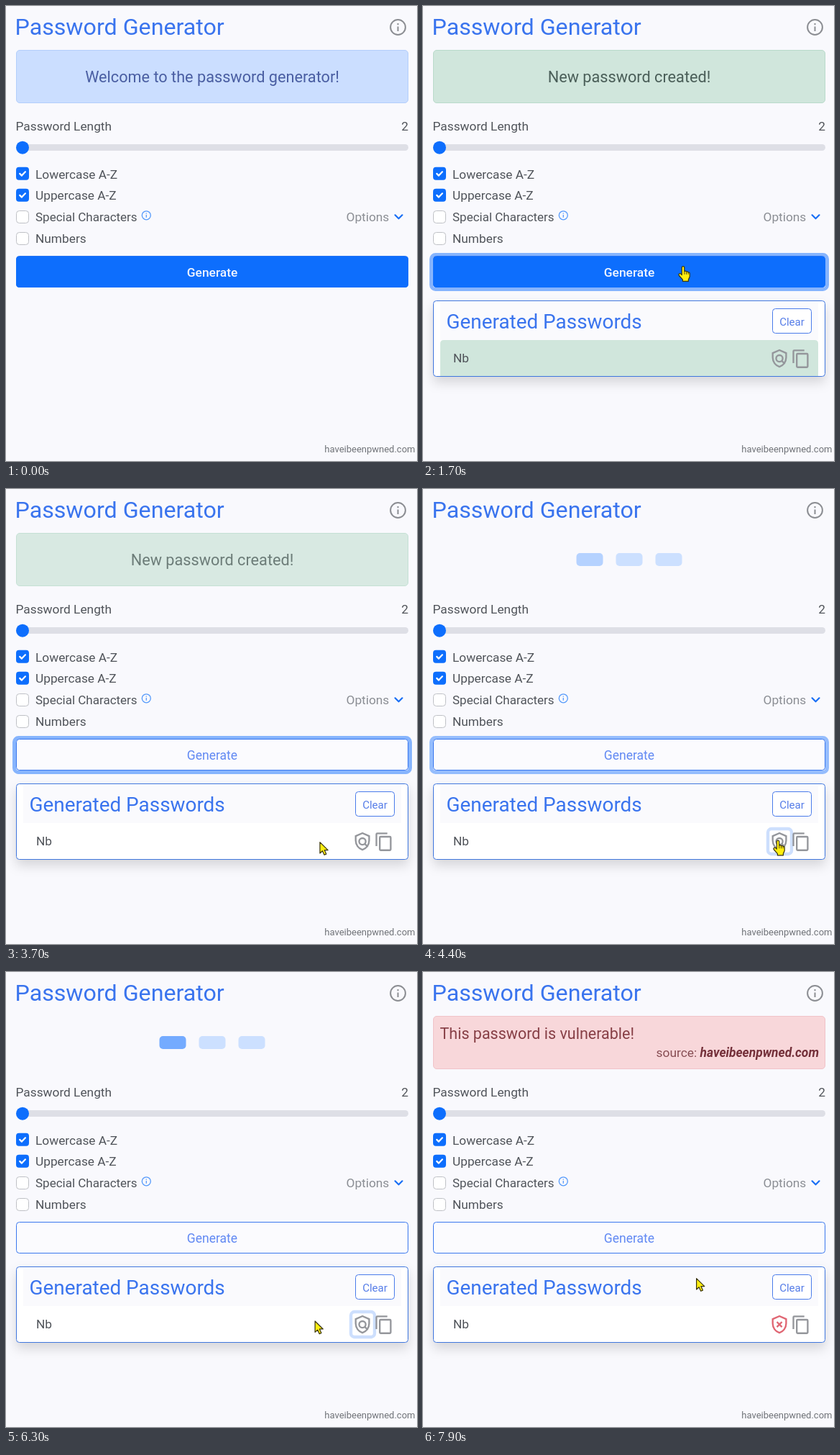
Write an HTML page that moves like this. It is 572 px wide and 632 px high and loops after 8 s.

```html
<!DOCTYPE html>
<html lang="en">
<head>
<meta charset="utf-8">
<title>Password Generator</title>
<style>
  html, body { margin: 0; width: 100%; height: 100%; overflow: hidden; background: #f9f9fd; }
  svg { display: block; width: 572px; height: 632px; }
  text { font-family: Roboto, "Open Sans", sans-serif; font-size: 17.3px; fill: #50545a; }
  .mid { text-anchor: middle; }
  .end { text-anchor: end; }
  .msg { font-size: 21.7px; }
  .head { fill: #3a74ee; }
  .line { fill: none; stroke-linecap: round; stroke-linejoin: round; }
  .icon { fill: none; stroke: #94969b; stroke-width: 2; }
  #panel { filter: drop-shadow(0 8px 8px rgba(0, 0, 0, .14)); }
</style>
</head>
<body>
<svg viewBox="0 0 572 632">
  <defs>
    <path id="shield" d="M12 2.1 4 5.65V11c0 5 3.4 9.6 8 10.9 4.6-1.3 8-5.9 8-10.9V5.65z"/>
    <g id="ticked">
      <rect width="18" height="18" rx="4" fill="#0d6efd"/>
      <path class="line" d="M5.200 9.200l2.700 2.700 5-5.300" stroke="#fff" stroke-width="2.2"/>
    </g>
    <rect id="empty" x=".5" y=".5" width="17" height="17" rx="4" fill="#fff" stroke="#bfc1c6"/>
  </defs>
  <rect width="572" height="632" fill="#f9f9fd"/>

  <text class="head" x="12.5" y="39.5" style="font-size:32.2px">Password Generator</text>
  <g fill="none" stroke="#8b8d92" stroke-width="2">
    <circle cx="545.5" cy="29.5" r="10.4"/>
    <path d="M545.5 28.5v6.5M545.5 24v2.3"/>
  </g>

  <g id="welcome">
    <rect x="14.5" y="61.5" width="545" height="73" rx="4.5" fill="#cbdeff" stroke="#b3cefb"/>
    <text class="mid msg" x="287" y="106" style="fill:#4a5ea2">Welcome to the password generator!</text>
  </g>
  <g id="created">
    <rect x="14.5" y="61.5" width="545" height="73" rx="4.5" fill="#d0e6dc" stroke="#b9dacb"/>
    <text class="mid msg" x="287" y="106" style="fill:#4a5e58">New password created!</text>
  </g>
  <g id="danger">
    <rect x="14.5" y="61.5" width="545" height="73" rx="4.5" fill="#f8d7da" stroke="#f1c3c8"/>
    <text class="msg" x="23.5" y="93" style="fill:#873f46;font-size:21.5px">This password is vulnerable!</text>
    <text class="end" x="551" y="118" style="fill:#874d53;font-size:17.4px">source: <tspan font-weight="700" font-style="italic" fill="#74303a">haveibeenpwned.com</tspan></text>
  </g>
  <g id="loader">
    <rect x="213.5" y="89" width="37" height="18" rx="5"/>
    <rect x="268.5" y="89" width="37" height="18" rx="5"/>
    <rect x="323.5" y="89" width="37" height="18" rx="5"/>
  </g>

  <text x="13.5" y="173">Password Length</text>
  <text class="end" x="560" y="173">2</text>
  <rect x="14" y="192" width="546" height="9" rx="4.5" fill="#dedfe6"/>
  <circle cx="23" cy="196.7" r="9" fill="#0d6efd"/>

  <use href="#ticked" x="14" y="223.7"/>
  <use href="#ticked" x="14" y="253.7"/>
  <use href="#empty" x="14" y="284"/>
  <use href="#empty" x="14" y="314"/>
  <text x="41" y="239.5">Lowercase A-Z</text>
  <text x="41" y="269">Uppercase A-Z</text>
  <text x="41" y="299" style="font-size:17px">Special Characters</text>
  <text x="41" y="328.5">Numbers</text>
  <g fill="none" stroke="#559afb" stroke-width="1.3">
    <circle cx="195.3" cy="290.8" r="6"/>
    <path d="M195.3 290v3.8M195.3 287.4v1.4"/>
  </g>
  <text x="473.5" y="299" style="fill:#8b8e94">Options</text>
  <path class="line" d="M541.5 290.3l5 5 5-5" stroke="#1a6ff5" stroke-width="2.2"/>

  <rect id="focus" x="11.5" y="345.5" width="551" height="48" rx="6" fill="none" stroke="#86b4fd" stroke-width="5"/>
  <rect x="14.5" y="347.5" width="545" height="43" rx="4" fill="#fbfbfe" stroke="#3a78ee"/>
  <text id="idleText" class="mid" x="287" y="375.5" style="fill:#6189f3;font-size:17.5px">Generate</text>
  <g id="hover">
    <rect x="14" y="347.5" width="546" height="43.5" rx="4.5" fill="#0d6efd"/>
    <text class="mid" x="287" y="375.5" style="fill:#f2f6ff;font-size:17.4px;font-weight:500">Generate</text>
  </g>

  <g id="result">
    <rect id="panel" x="14.5" y="409.5" width="545" height="105" rx="4" fill="#fff" stroke="#3f76de"/>
    <rect x="24" y="411" width="526" height="53" fill="#fafafd"/>
    <path id="row" d="M24 514V469q0-5 5-5H545q5 0 5 5v45z" fill="#d0e6dc"/>
    <text class="head" x="32.5" y="448" style="font-size:27.9px">Generated Passwords</text>
    <rect x="486.5" y="420.5" width="54" height="34" rx="4" fill="#fff" stroke="#4a7bea"/>
    <text class="mid" x="513.5" y="443.5" style="font-size:15px;fill:#567de8">Clear</text>
    <text x="42" y="495">Nb</text>
    <rect id="ring" x="480" y="472" width="33" height="35" rx="5" fill="none" stroke="#cddffd" stroke-width="4.4"/>
    <g class="icon" transform="translate(482 475.5) scale(1.17)">
      <g id="check">
        <use href="#shield"/>
        <circle cx="12" cy="12" r="3.9"/>
        <path d="M14.8 14.8l3.6 3.6"/>
      </g>
      <g id="bad" stroke="#e06673">
        <use href="#shield"/>
        <path d="M9 9l6 6M15 9l-6 6"/>
      </g>
    </g>
    <g class="icon" transform="translate(512 476) scale(1.17)">
      <path d="M3 17V3q0-1 1-1H16"/>
      <rect x="7" y="6" width="13" height="16" rx="1"/>
    </g>
  </g>

  <text class="end" x="569.5" y="620" style="font-size:13px;fill:#707378">haveibeenpwned.com</text>

  <g id="cursor" fill="#ffee10" stroke="#3a3510" stroke-width="1.2" stroke-linejoin="round">
    <path id="arrow" d="M.6.6V16l3.5-3.3 2.6 5.6 2.7-1.2-2.5-5.5h4.9z"/>
    <g id="hand">
      <path d="M-1.8 12V2q0-1.8 1.8-1.8T1.8 2v5q2-.8 2.6.6 2-.6 2.5.8 2.3-.3 2.3 1.8v4.3L7.4 18.6v2.2H-.6v-2.2L-5.6 13q-1.2-2 .4-2.8 1.2-.5 2.2.5z"/>
      <path d="M1.8 7v4.3M4.5 8v3.3M7 8.7v2.6" fill="none" stroke-width=".9"/>
    </g>
  </g>
</svg>
<script>
  const LOOP = 8000, STEP = 100;
  const MADE = 1000, CLICK = 4380, FOUND = 6800;
  const $ = id => document.getElementById(id);
  const bars = [...$('loader').children];

  // time, x, y of the pointer tip
  const path = [
    [0, 362, 361.5], [3050, 362, 361.5], [3650, 436, 490], [3850, 438, 490],
    [4300, 494, 488], [4600, 494, 488], [5050, 470, 488.5], [5500, 462, 488],
    [6200, 430, 484.5], [6500, 428, 484], [7400, 380, 425], [LOOP, 380, 425]
  ];

  const ramp = (t, start, span) => Math.min(1, Math.max(0, (t - start) / span));
  const smooth = u => u * u * (3 - 2 * u);
  const mix = (a, b, u) => a + (b - a) * u;
  const fade = (id, v) => $(id).setAttribute('opacity', v);
  const show = (id, on) => fade(id, on ? 1 : 0);

  function pointer(t) {
    const i = path.findIndex(p => p[0] > t);
    const [a, b] = [path[i - 1], path[i]];
    const u = smooth(ramp(t, a[0], b[0] - a[0]));
    return [mix(a[1], b[1], u), mix(a[2], b[2], u)];
  }

  function draw(t) {
    show('welcome', t < MADE);
    fade('created', t < MADE ? 0 : 1 - ramp(t, 3600, 500));
    fade('danger', ramp(t, FOUND - 100, 150));
    show('result', t >= MADE);
    fade('row', ramp(t, MADE + 100, 500) - ramp(t, 3000, 500));

    const hover = 1 - ramp(t, 3220, 150);
    fade('hover', hover);
    fade('idleText', 1 - hover);
    fade('focus', t < MADE ? 0 : 1 - ramp(t, CLICK, 150));

    const busy = t >= CLICK && t < FOUND;
    show('loader', busy);
    show('ring', busy);
    show('check', t < FOUND);
    show('bad', t >= FOUND);

    const phase = (t - CLICK + 4500) / 1500 % 1;
    bars.forEach((bar, i) => {
      const u = phase * 3 - i;
      const glow = u > 0 && u < 1 ? Math.sin(Math.PI * u) : 0;
      const rgb = [mix(204, 22, glow), mix(224, 114, glow), 255].map(Math.round);
      bar.setAttribute('fill', `rgb(${rgb})`);
    });

    const [x, y] = pointer(t);
    const onButton = y < 391 && t < 3600;
    const onShield = x > 481 && y > 471;
    $('cursor').setAttribute('transform', `translate(${x} ${y})`);
    show('cursor', t >= STEP);
    show('hand', onButton || onShield);
    show('arrow', !(onButton || onShield));
  }

  const begin = performance.now();
  function tick() {
    const t = (performance.now() - begin) % LOOP;
    draw(Math.floor(t / STEP) * STEP);
    requestAnimationFrame(tick);
  }
  tick();
</script>
</body>
</html>
```
